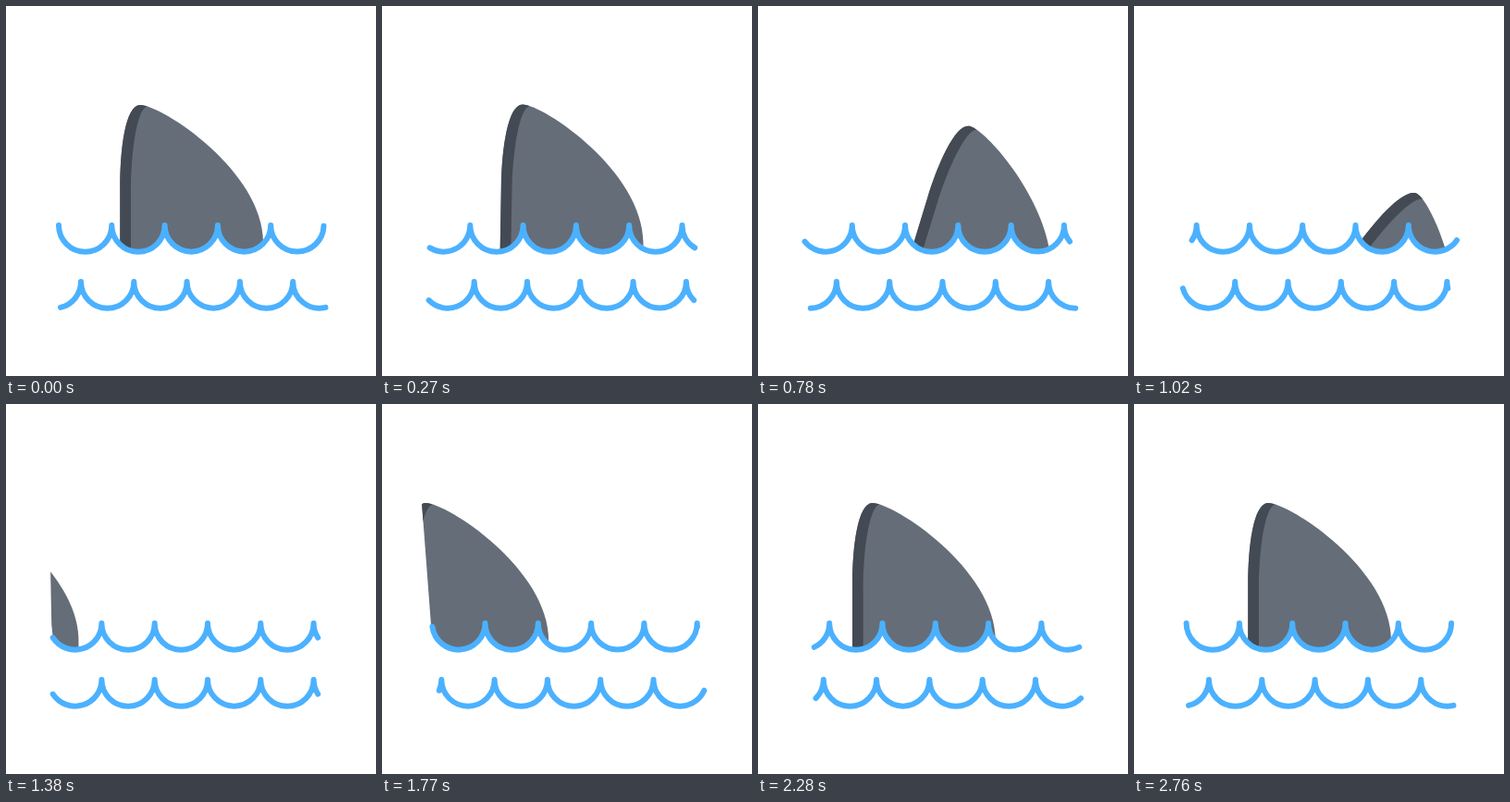
Write an HTML page that moves like this. It is 400 by 400 pixels and loops after 3790 ms.

```html
<!DOCTYPE html>
<html lang="en">
<head>
<meta charset="utf-8">
<title>Shark fin</title>
<style>
  html, body { margin: 0; width: 100%; height: 100%; overflow: hidden; background: #fff; }
  svg { display: block; width: 100vw; height: 100vh; }
  .wave { fill: none; stroke: #4bb1ff; stroke-width: 6; stroke-linecap: round; stroke-linejoin: round; }
</style>
</head>
<body>
<svg viewBox="0 0 400 400">
  <clipPath id="above"><path id="mask"/></clipPath>
  <g clip-path="url(#above)">
    <g id="fin">
      <path fill="#656d78" d="M123.3 290V195C123.3 155 129 107 145 107C168 107 278 178 278 256V290Z"/>
      <path fill="#434a54" d="M123.3 290V195C123.3 155 129 107 145 107Q149 107 152.5 108.5C141 112 135 160 135 200V290Z"/>
    </g>
  </g>
  <path id="front" class="wave"/>
  <path id="back" class="wave"/>
</svg>
<script>
const LOOP = 3790, END = 2760, STEP = 30;
const PERIOD = 57.3, R = PERIOD / 2, LEFT = 56.6, COUNT = 5;
const $ = id => document.getElementById(id);

// Travel of each row of waves at the key times
const TIMES = [0, 510, 1020, 1380, 1770, 2280, 2760];
const FRONT = [0, -40, -104, -182.8, -232, -266.3, -286.9];
const BACK = [0, 38, 85.5, 137, 212.5, 276.3, 286.5];

// Smooth monotone curve through the keys
function curve(keys, t) {
  const slope = i => (keys[i + 1] - keys[i]) / (TIMES[i + 1] - TIMES[i]);
  const last = TIMES.length - 1;
  const tangent = i => {
    if (i === 0) return slope(0) * 0.8;
    if (i === last) return slope(last - 1) * 0.5;
    const a = slope(i - 1), b = slope(i);
    return a * b > 0 ? 2 * a * b / (a + b) : 0;
  };
  let i = 0;
  while (i < last - 1 && t > TIMES[i + 1]) i++;
  const h = TIMES[i + 1] - TIMES[i], u = (t - TIMES[i]) / h, v = 1 - u;
  return keys[i] * v * v * (1 + 2 * u) + keys[i + 1] * u * u * (1 + 2 * v)
    + h * u * v * (tangent(i) * v - tangent(i + 1) * u);
}

// Scallops cut to a fixed arc length, so the ends slide along the curve
function wave(cusp, y) {
  const offset = (((LEFT - cusp) % PERIOD) + PERIOD) % PERIOD;
  const angle = Math.PI * offset / PERIOD;
  const first = LEFT - offset;
  const x = first + R * (1 - Math.cos(angle));
  const startY = y + R * Math.sin(angle);
  const arc = (ax, ay) => `A${R} ${R} 0 0 0 ${ax.toFixed(2)} ${ay.toFixed(2)}`;
  let d = `${x.toFixed(2)} ${startY.toFixed(2)}`;
  for (let i = 1; i <= COUNT; i++) d += arc(first + i * PERIOD, y);
  d += arc(x + COUNT * PERIOD, startY);
  return { d, x };
}

function finTransform(t) {
  if (t < 1220) {
    const u = t / 1020;
    const dx = 63 * u ** 2, dy = 100 * u ** 4.2, turn = 35 * u ** 2.7;
    return `translate(${dx} ${dy}) rotate(${turn} 200 262)`;
  }
  return `translate(${-21.3 * ((2790 - t) / 510) ** 2.2} 0)`;
}

function render(t) {
  const front = wave(57 + curve(FRONT, t), 237);
  const back = wave(81 + curve(BACK, t), 298);
  $("front").setAttribute("d", "M" + front.d);
  $("back").setAttribute("d", "M" + back.d);

  const lean = Math.min(1, Math.max(0, (t - 1380) / 390));
  const top = 46.5 - 4 * lean;
  $("mask").setAttribute("d", `M${top} 100L${front.x - 1.5} 238L${front.d}L400 90H${top}Z`);
  $("fin").setAttribute("transform", finTransform(t));
}

const start = performance.now();
function tick() {
  const t = (performance.now() - start) % LOOP;
  render(Math.min(END, Math.floor(t / STEP) * STEP));
  requestAnimationFrame(tick);
}
tick();
</script>
</body>
</html>
```
